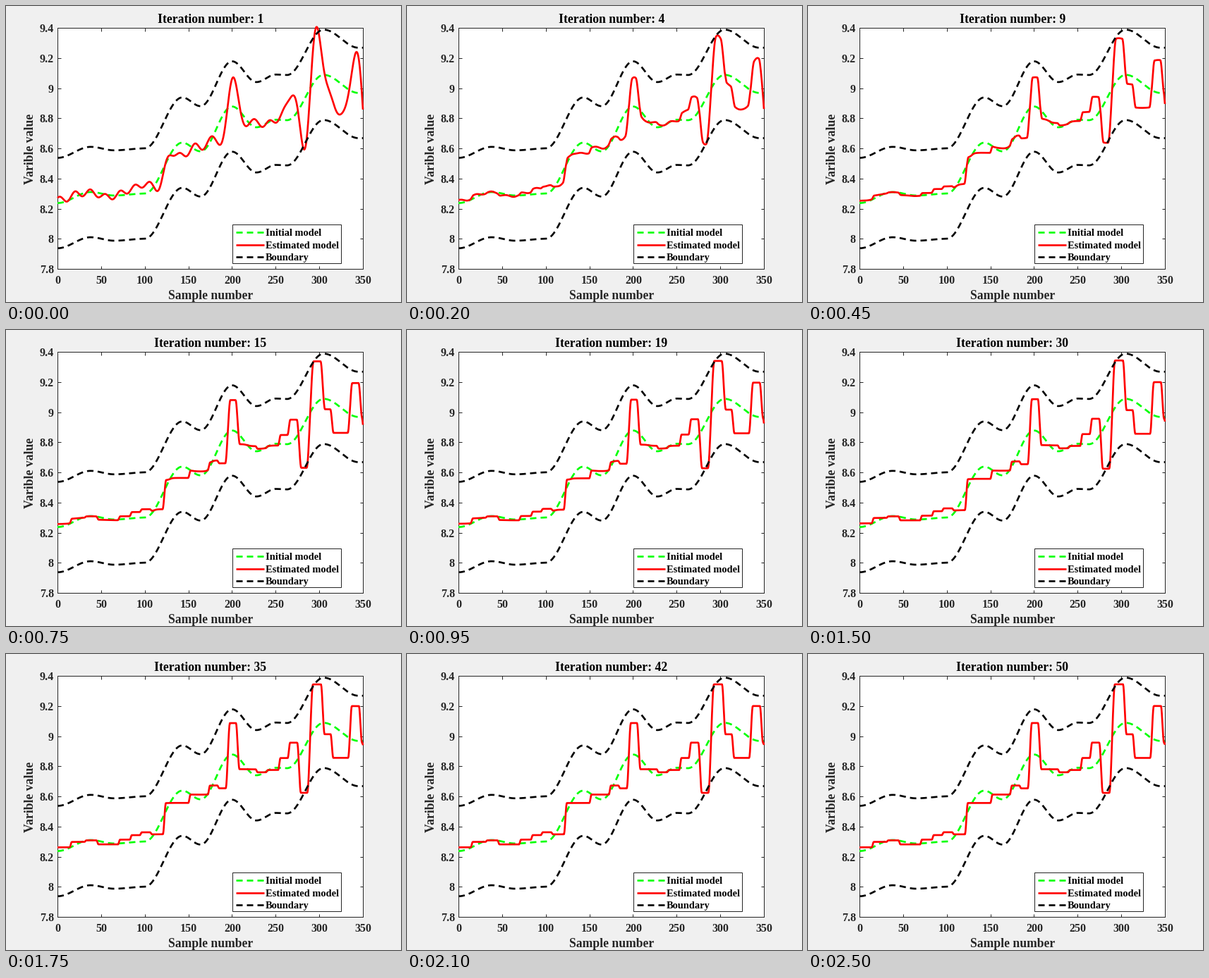
A matplotlib script for the animation above (2550 ms loop, 560 by 420 pixels).

```python
import numpy as np
import matplotlib.pyplot as plt
from matplotlib.animation import FuncAnimation
from matplotlib.patches import Rectangle

W, H, DPI = 560, 420, 100
LEFT, RIGHT, TOP, BOTTOM = 73, 506, 31, 373
INK = "#262626"
STEPS = 50
FRAME_MS = 50

# Turning points of the smooth initial model
TURNS = [(0, 8.237), (38, 8.310), (65, 8.287), (100, 8.300), (143, 8.638),
         (164, 8.580), (200, 8.878), (228, 8.740), (250, 8.790), (263, 8.787),
         (305, 9.088), (345, 8.968)]

# Final staircase: where each flat stretch starts, and its height.
# The last one lies past the right edge and only pulls the curve's end down.
STAIRS = [(0, 8.262), (15.2, 8.298), (32, 8.308), (45.8, 8.281), (70.5, 8.313),
          (84, 8.343), (95.5, 8.362), (107.2, 8.348), (122.5, 8.556),
          (151.2, 8.612), (173.5, 8.672), (184.2, 8.653), (195.2, 9.087),
          (206.5, 8.780), (228.2, 8.760), (240, 8.775), (254.2, 8.855),
          (265.2, 8.957), (276.8, 8.623), (289.5, 9.344), (304, 9.012),
          (314.5, 8.855), (335.2, 9.200), (347.2, 8.955), (352.5, 8.300)]

REACH = 26      # half width of the smoothing kernel, in samples
CUTOFF = 17     # shortest period the first estimate can follow


def ease_through(points, x):
    """Cosine easing from each turning point to the next."""
    px, py = np.array(points).T
    k = np.clip(np.searchsorted(px, x, side="right") - 1, 0, len(px) - 2)
    t = np.clip((x - px[k]) / (px[k + 1] - px[k]), 0, 1)
    return py[k] + (py[k + 1] - py[k]) * (1 - np.cos(np.pi * t)) / 2


def staircase(x, spread=0):
    """Sum of eased steps; larger jumps and more spread give wider ramps."""
    y = np.full_like(x, STAIRS[0][1])
    for (_, low), (edge, high) in zip(STAIRS, STAIRS[1:]):
        half = (1 + 3 * abs(high - low)) * (1 + spread)
        t = np.clip((x - edge) / (2 * half) + 0.5, 0, 1)
        y += (high - low) * t * t * (3 - 2 * t)
    return y


def first_estimate():
    """Band-limited staircase with a faint ripple."""
    t = np.arange(-REACH, REACH + 0.1, 0.5)
    kernel = np.sinc(2 * t / CUTOFF) * np.hanning(len(t))
    wide = np.arange(-REACH, 350 + REACH + 0.1, 0.5)
    smooth = np.convolve(staircase(wide), kernel / kernel.sum(), mode="valid")
    return smooth + 0.018 * np.cos(2 * np.pi * (xs - 20) / 17.2)


def estimate(step):
    stairs = staircase(xs, np.exp(-(step - 1) / 10))
    pull = 0.015 * np.exp(-max(step - 9, 0) / 8)
    stairs += pull * np.tanh((initial - stairs) / 0.03)
    w = np.exp(-(step - 1) / 2.3)
    return w * first + (1 - w) * stairs


def pt(px):
    return px * 72 / DPI


def label(x, y, text, size, color=INK, ha="center", **kw):
    return fig.text(x / W, 1 - y / H, text, fontsize=pt(size), color=color,
                    ha=ha, va="baseline", family="Liberation Serif",
                    weight="bold", rotation_mode="anchor", **kw)


xs = np.arange(0, 350.1, 0.5)
initial = ease_through(TURNS, xs)
first = first_estimate()

fig = plt.figure(figsize=(W / DPI, H / DPI), dpi=DPI, facecolor="#f0f0f0")
ax = fig.add_axes([LEFT / W, 1 - BOTTOM / H, (RIGHT - LEFT) / W, (BOTTOM - TOP) / H])
ax.set(xlim=(0, 350), ylim=(7.8, 9.4))
ax.set_xticks(range(0, 351, 50))
ax.set_yticks(np.linspace(7.8, 9.4, 9))
ax.tick_params(direction="in", top=True, right=True, length=pt(4.5),
               width=pt(1), color=INK, labelbottom=False, labelleft=False)
for side in ax.spines.values():
    side.set(color=INK, linewidth=pt(1), zorder=1.5)

for i in range(8):
    label(LEFT + 0.5 + (RIGHT - LEFT) * i / 7, 394, str(50 * i), 16)
for i in range(9):
    label(68, BOTTOM + 6 - (BOTTOM - TOP) * i / 8, f"{7.8 + 0.2 * i:.2g}", 16, ha="right")
label(290, 416, "Sample number", 17.6)
label(39, 202.5, "Varible value", 17.6, rotation=90)
title = label(290, 24, "", 17.6, color="black")

WIDTH = 2.67
DASH = (0, (9 / WIDTH, 6 / WIDTH))
GREEN = dict(color="#00ff00", linestyle=DASH)
RED = dict(color="#ff0000", linestyle="-")
BLACK = dict(color="#000000", linestyle=DASH)
SHARED = dict(linewidth=pt(WIDTH), dash_capstyle="butt",
              solid_capstyle="butt", clip_on=False)

ax.plot(xs, initial, **GREEN, **SHARED, zorder=2)
red_line, = ax.plot(xs, first, **RED, **SHARED, zorder=3)
for offset in (0.3, -0.3):
    ax.plot(xs, initial + offset, **BLACK, **SHARED, zorder=4)

# Legend, laid out in stage pixels
key = fig.add_axes([0, 0, 1, 1])
key.set(xlim=(0, W), ylim=(H, 0))
key.axis("off")
key.add_patch(Rectangle((321, 310), 154, 55, facecolor="white",
                        edgecolor=INK, linewidth=pt(1)))
rows = (("Initial model", GREEN), ("Estimated model", RED), ("Boundary", BLACK))
for i, (text, style) in enumerate(rows):
    y = 321 + 17.5 * i
    key.plot([325.5, 365.5], [y, y], **style, **SHARED)
    label(368, y + 5, text, 14.4, color="black", ha="left")


def update(frame):
    step = max(1, frame)
    title.set_text(f"Iteration number: {step}")
    red_line.set_ydata(estimate(step))
    return title, red_line


anim = FuncAnimation(fig, update, frames=STEPS + 1, interval=FRAME_MS,
                     repeat=True, repeat_delay=0, blit=False)
plt.show()
```
